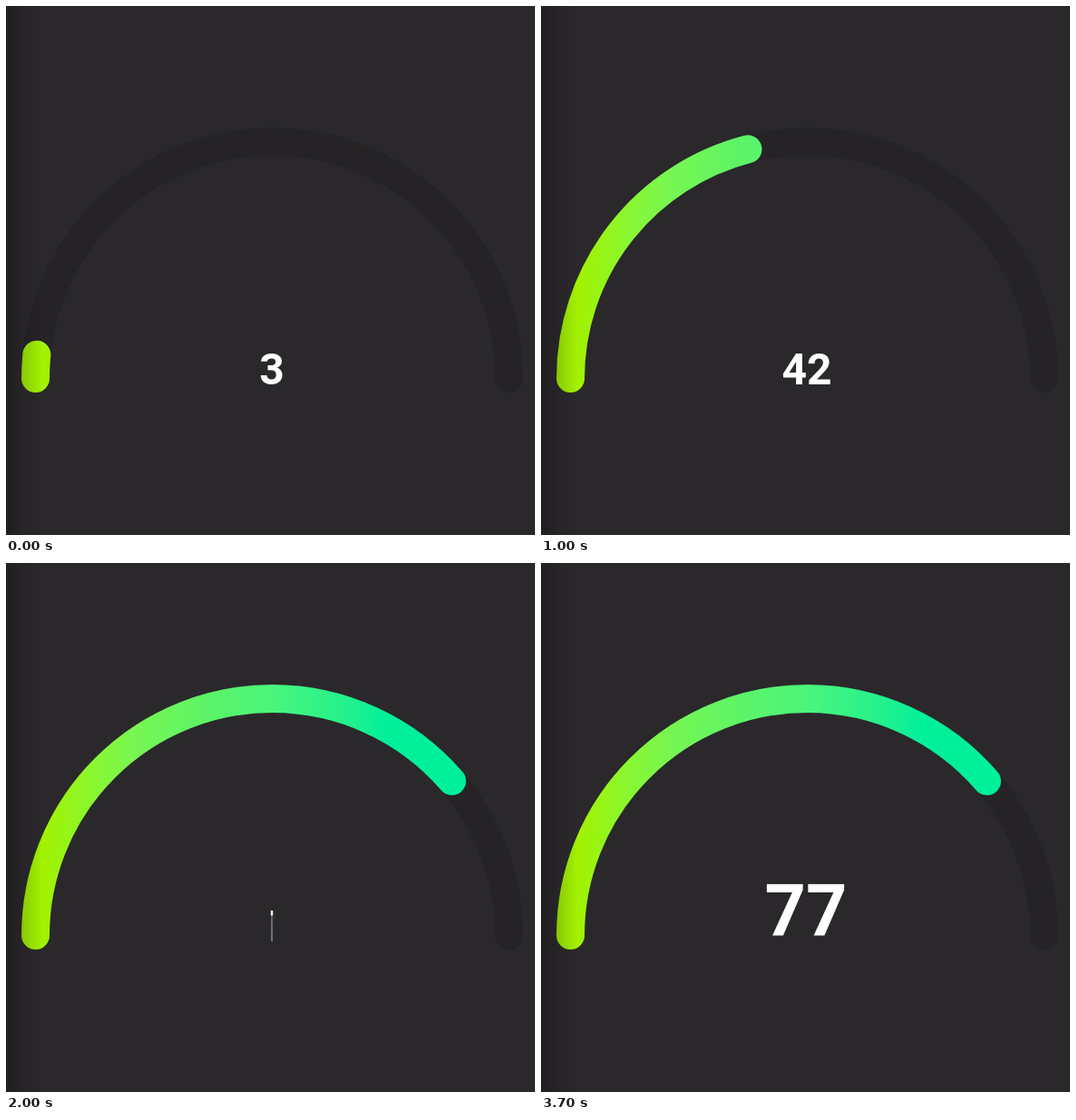
An HTML page for the animation above (3.8 s loop, 583 by 583 pixels).

```html
<!DOCTYPE html>
<html lang="en">
<head>
<meta charset="utf-8">
<title>Gauge</title>
<style>
  html, body { margin: 0; width: 100%; height: 100%; overflow: hidden; background: #2a282b; }
  svg { display: block; width: 100vw; height: 100vh; }
  path { fill: none; stroke-width: 31; stroke-linecap: round; }
  text { font: 700 48px Roboto, sans-serif; fill: #fff; text-anchor: middle; }
</style>
</head>
<body>
<svg viewBox="0 0 583 583">
  <defs>
    <linearGradient id="glow" gradientUnits="userSpaceOnUse" x1="0" y1="0" x2="583" y2="0">
      <stop offset=".07" stop-color="#a2f200"/>
      <stop offset=".17" stop-color="#88f733"/>
      <stop offset=".245" stop-color="#77f652"/>
      <stop offset=".39" stop-color="#5bf46a"/>
      <stop offset=".5" stop-color="#4bf57a"/>
      <stop offset=".66" stop-color="#1ef190"/>
      <stop offset=".72" stop-color="#00f09a"/>
    </linearGradient>
    <linearGradient id="edge">
      <stop offset="0" stop-color="#141214" stop-opacity=".45"/>
      <stop offset=".5" stop-color="#141214" stop-opacity=".16"/>
      <stop offset="1" stop-color="#141214" stop-opacity="0"/>
    </linearGradient>
  </defs>
  <path d="M32.5 410.5a261 261 0 0 1 522 0" stroke="#252326"/>
  <path id="bar" d="M32.5 410.5a261 261 0 0 1 522 0" stroke="url(#glow)" pathLength="100"/>
  <rect width="40" height="583" fill="url(#edge)"/>
  <text id="label"></text>
</svg>
<script>
  const bar = document.getElementById('bar');
  const label = document.getElementById('label');
  const LOOP = 3800, STEP = 100, LEAD = 83, COUNT = 2000, GOAL = 77.4;
  const GROW_START = 1900, GROW_TIME = 1000, GROWTH = 1.65;
  const clamp = x => Math.min(1, Math.max(0, x));
  const ease = x => x * x * (3 - 2 * x);

  function draw(now) {
    const t = Math.floor(now % LOOP / STEP) * STEP;
    const value = GOAL * clamp((t + LEAD) / COUNT);
    bar.setAttribute('stroke-dasharray', `${value} 200`);
    label.textContent = Math.round(value);

    // The finished number unfolds sideways while it grows from its lower edge.
    const p = ease(clamp((t - GROW_START) / GROW_TIME));
    const sx = t > GROW_START ? GROWTH * p : 1;
    const sy = 1 + (GROWTH - 1) * p;
    label.setAttribute('transform', `translate(${293 - p} 426) scale(${sx} ${sy}) translate(0 -9)`);
  }

  const start = performance.now();
  function tick() {
    draw(performance.now() - start);
    requestAnimationFrame(tick);
  }
  tick();
</script>
</body>
</html>
```
